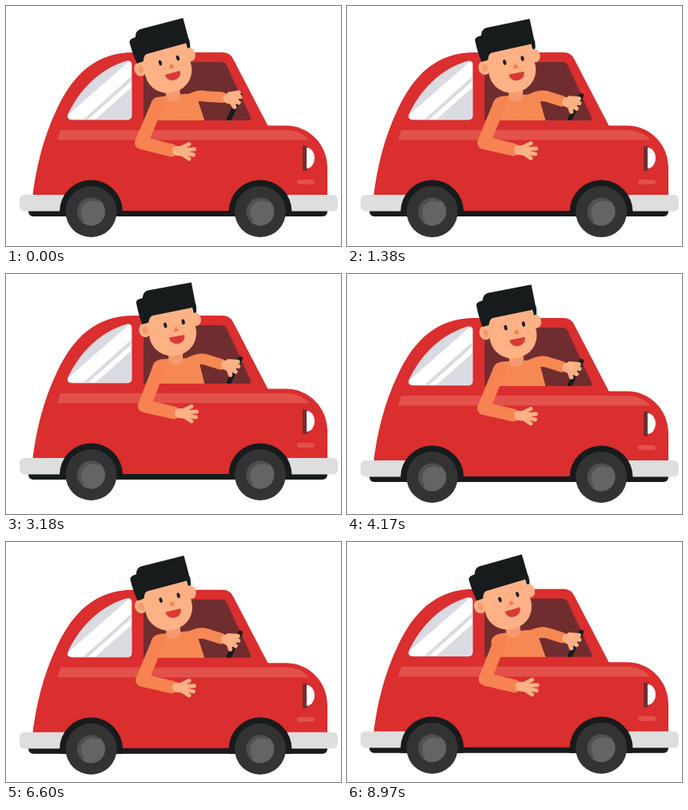
Recreate the animation shown at these times as an HTML page with a canvas. Size 419 px wide and 300 px high, loop 9 s.

```html
<!DOCTYPE html>
<html lang="en">
<head>
<meta charset="utf-8">
<title>Driving</title>
<style>
html, body { margin: 0; width: 100%; height: 100%; overflow: hidden; background: #fff; }
canvas { display: block; width: 419px; height: 300px; }
</style>
</head>
<body>
<canvas id="stage"></canvas>
<script>
const W = 419, H = 300, LOOP = 9000, BEAT = 235, TAU = Math.PI * 2;
const RED = '#da2e2f', BLACK = '#171b1c', SKIN = '#fdb184', SHADE = '#f59a6e';
const SHIRT = '#f68853', SLEEVE = '#f68351', MAROON = '#702d2f';

const canvas = document.getElementById('stage');
const ctx = canvas.getContext('2d');
const ratio = window.devicePixelRatio || 1;
canvas.width = W * ratio;
canvas.height = H * ratio;

// [phase, value] knots of periodic curves
const LEAN = [[.085, .5], [.17, -1.2], [.53, 4.2], [.7, 3.9], [.87, 2.9]];
const ELBOW = [[.085, 1], [.17, 3.5], [.53, 4], [.7, 2], [.87, 2]];

// Smooth periodic curve through the knots
function wave(knots, p) {
  const n = knots.length;
  const at = i => {
    const lap = Math.floor(i / n), k = knots[i - lap * n];
    return [k[0] + lap, k[1]];
  };
  let i = -1;
  while (at(i + 1)[0] <= p) i++;
  const a = at(i - 1), b = at(i), c = at(i + 1), d = at(i + 2);
  const h = c[0] - b[0], u = (p - b[0]) / h;
  const m = (c[1] - a[1]) / (c[0] - a[0]) * h;
  const k = (d[1] - b[1]) / (d[0] - b[0]) * h;
  const u2 = u * u, u3 = u2 * u;
  return (2 * u3 - 3 * u2 + 1) * b[1] + (u3 - 2 * u2 + u) * m
    + (3 * u2 - 2 * u3) * c[1] + (u3 - u2) * k;
}

function fill(color, d) {
  ctx.fillStyle = color;
  ctx.fill(new Path2D(d));
}

function oval(color, x, y, rx, ry = rx) {
  ctx.fillStyle = color;
  ctx.beginPath();
  ctx.ellipse(x, y, rx, ry, 0, 0, TAU);
  ctx.fill();
}

function box(color, x, y, w, h, r) {
  ctx.fillStyle = color;
  ctx.beginPath();
  ctx.roundRect(x, y, w, h, r);
  ctx.fill();
}

function line(color, width, d) {
  ctx.strokeStyle = color;
  ctx.lineWidth = width;
  ctx.lineCap = ctx.lineJoin = 'round';
  ctx.stroke(new Path2D(d));
}

function around(x, y, deg, draw) {
  ctx.save();
  ctx.translate(x, y);
  ctx.rotate(deg * Math.PI / 180);
  ctx.translate(-x, -y);
  draw();
  ctx.restore();
}

function rearWindow() {
  const shape = 'M83 142 Q75 142 78 135 C92 105 117 79 151 69 Q157 68 157 73 V137 Q157 142 152 142 Z';
  fill('#dadbe2', shape);
  ctx.save();
  ctx.clip(new Path2D(shape));
  fill('#fff', 'M66 146 L160 64 V85 L92 146 Z M98 146 L160 91 V99 L107 146 Z');
  ctx.restore();
  line('#f3e4e6', .8, shape);
}

function body() {
  box(BLACK, 28, 248, 374, 15, 6);
  fill(RED, 'M33 240 C37 205 46 165 64 128 C84 86 112 58 160 58 H271 Q280 58 284 66 L327.5 149.5 H350 C379 149.5 402 173 402 202 V256 H33 Z');
  fill('#e3514b', 'M68 155 H350 C363 155 373 160 379 167.5 H64 Z');
  rearWindow();
  fill(MAROON, 'M172 78 Q172 70 180 70 H269 Q274 70 276 74 L306 139 Q307 143 303 143 H172 Z');
  box(MAROON, 371, 175, 5.5, 31, 1);
  fill('#fff', 'M376 177 A10 13 0 0 1 376 203 Z');
  box('#e3514b', 364, 217, 22, 6, 3);
  box('#dedede', 17, 236, 64, 20.5, 6);
  box('#dedede', 348, 236, 67, 20.5, 6);
}

function wheel(x) {
  ctx.fillStyle = BLACK;
  ctx.beginPath();
  ctx.arc(x, 257, 39.5, Math.PI, TAU);
  ctx.lineTo(x + 39.5, 263);
  ctx.lineTo(x - 39.5, 263);
  ctx.fill();
  oval('#333', x, 257, 32);
  oval('#505050', x, 257, 17.5);
  ctx.fillStyle = '#646464';
  ctx.beginPath();
  ctx.arc(x, 257, 17.5, -.9, Math.PI - .9);
  ctx.fill();
  oval('#646464', x + 2, 258, 14.5);
}

function head() {
  fill(SHADE, 'M199 98 H217 L218 112 Q217 119 208 119 Q200 118 200 112 Z');
  around(204, 78, -15, () => {
    oval(SKIN, 169, 69.5, 7.5, 9);
    oval(SKIN, 234, 68, 6.5, 8.5);
    oval(SHADE, 169.5, 70, 3.5, 5);
    box(SKIN, 173, 44, 59, 64, [12, 12, 28, 28]);
    oval(BLACK, 195.2, 68.4, 2, 3.4);
    oval(BLACK, 218, 68.3, 2, 3.4);
    fill('#f07f55', 'M207.5 72.5 L211 78 Q207.5 80 204 78 Z');
    fill('#d93a35', 'M197 84.5 H216.5 C216.5 97 197 97 197 84.5 Z');
  });
  fill(BLACK, 'M154.5 45 Q154.5 41 162 39 Q162 31 168 29 L221.5 15 L228.5 41 Q230 42 230.5 52 L227 53 L225 46.5 L176 60 Q172 62 172 69 L164 72 C160 63 157 55 154.5 45 Z');
}

function restingArm(ex, kick) {
  const hx = ex - 1 + kick, hy = kick - 1;
  line(SLEEVE, 16, `M${190 + ex * .5} 122 L${169 + ex} 171 L${207 + hx} ${180.5 + hy}`);
  ctx.save();
  ctx.translate(hx, hy);
  line(SKIN, 12, 'M214 181 L222 182');
  line(SKIN, 5, 'M218 178 L229 172.5 M222 180 L235.5 179 M222 183 L234.5 186 M220 185 L229 191');
  ctx.restore();
}

function steeringArm(kick) {
  const dx = 3 * kick, dy = -6 * kick;
  line(BLACK, 6, 'M293 112 L279 141');
  line(SHIRT, 13.5, `M226 119 Q240 110 250 113 L${269 + dx * .5} ${119 + dy * .8}`);
  ctx.save();
  ctx.translate(dx, dy);
  around(282, 123, -14 * kick, () => {
    line(SKIN, 12, 'M275 120 L282 123.5');
    line(SKIN, 5.5, 'M278 115 L290 116 M282 119 L290.5 121.5 M282 123 L287 128 M278 124 L280.5 132');
  });
  ctx.restore();
}

function driver(lean, kick) {
  const sway = draw => around(208, 155, lean, draw);
  sway(() => fill(SHIRT, 'M184 148 L181 124 Q182 114 196 113 L222 110 Q236 108 240 118 L250 148 Z'));
  steeringArm(kick);
  sway(head);
}

function draw(t) {
  const p = t / BEAT % 1;
  const kick = Math.exp(-t / 250);
  const bob = -2 + 4 * Math.cos(TAU * (p - .04)) - 1.9 * kick;
  const lean = wave(LEAN, p) - wave(LEAN, 0) * kick;
  const ex = wave(ELBOW, p) - wave(ELBOW, 0) * kick;

  ctx.setTransform(ratio, 0, 0, ratio, 0, 0);
  ctx.fillStyle = '#fff';
  ctx.fillRect(0, 0, W, H);
  ctx.translate(0, bob);
  body();
  wheel(106.5);
  wheel(318);
  driver(lean, kick);
  // Door edge hides the lap, the near arm hangs outside
  fill(RED, 'M172 143 H306 V152 H172 Z');
  restingArm(ex, kick);
}

const start = performance.now();
function tick() {
  draw((performance.now() - start) % LOOP);
  requestAnimationFrame(tick);
}
tick();
</script>
</body>
</html>
```
